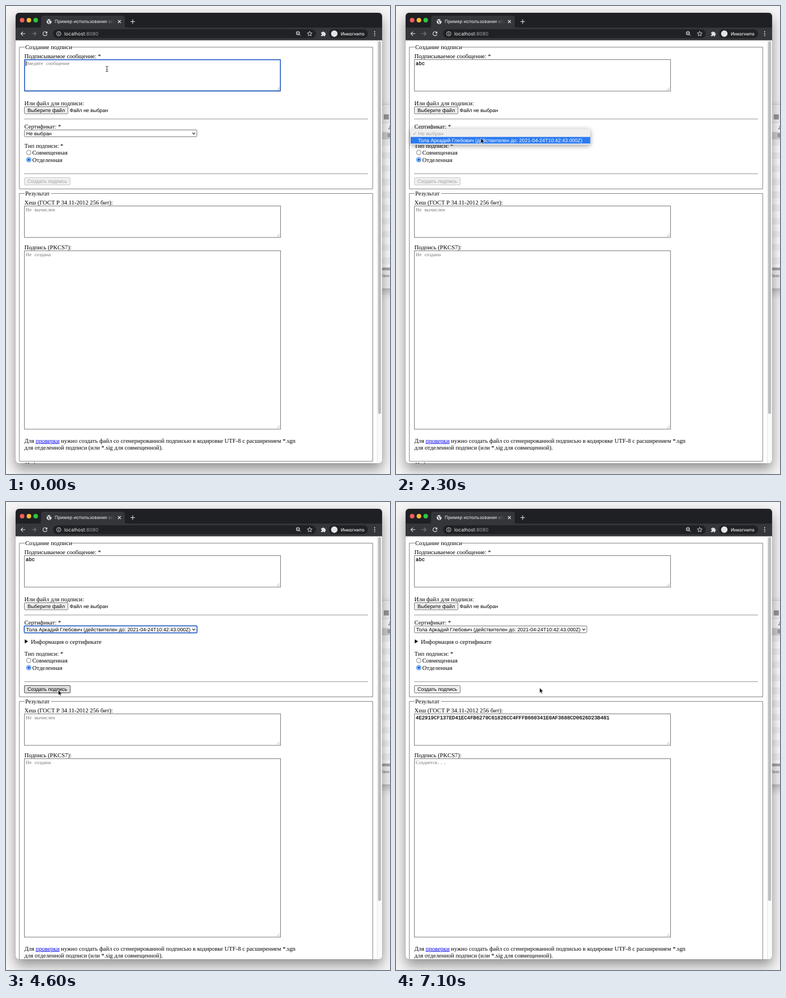
Animation, 679 px wide and 825 px high, one loop 8 s. Source, as an HTML page:

```html
<!DOCTYPE html>
<html lang="ru">
<head>
<meta charset="utf-8">
<title>Создание подписи</title>
<style>
html, body { margin: 0; width: 100%; height: 100%; overflow: hidden; background: #f5f5f6; }
.stage { position: relative; width: 679px; height: 825px; overflow: hidden; }
.stage > * { position: absolute; }

/* list window behind */
.back { left: 640px; top: 174px; width: 80px; height: 324px; background: #fcfcfc; box-shadow: 0 0 1px #777, 0 6px 16px rgba(0,0,0,.28); font: 7.5px Inter, sans-serif; color: #555; }
.back > * { position: absolute; left: 0; width: 100%; }
.bar { height: 31px; background: #f3f3f4; border-bottom: 1px solid #dcdcdc; }
.mark { left: 28px !important; top: 17px; width: 9px !important; height: 9px; background: #9a9a9c; }
.head { top: 32px; height: 16px; line-height: 17px; text-indent: 36px; font-style: italic; border-bottom: 1px solid #ddd; }
.rows { top: 48.5px; margin: 0; font: inherit; line-height: 11.58px; height: 239px; overflow: hidden; text-indent: 34.5px;
  background: linear-gradient(#d2d2d4 11.58px, transparent 0), repeating-linear-gradient(#fff 0 11.58px, #f3f4f5 0 23.16px); }
.slider { top: 287px; height: 5px; background: #a9a9ab; }
.foot { top: 292px; height: 32px; line-height: 20px; text-indent: 23px; background: #f2f2f3; font-size: 6.6px; }

.win { left: 17px; top: 12px; width: 648px; height: 794px; border-radius: 6px; background: #fff; box-shadow: 0 0 1px rgba(0,0,0,.5), 0 10px 22px rgba(0,0,0,.42); }
svg { left: 0; top: 0; }
text { font: 10.6px "Liberation Serif", serif; text-rendering: geometricPrecision; white-space: pre; }
.ui { font: 8.93px "Liberation Sans", sans-serif; }
.mono { font: 8.93px "Liberation Mono", monospace; stroke: #000; stroke-width: .25; }
.ph { font-size: 8.85px; fill: #757575; word-spacing: 3.1px; }
.ph tspan { font-family: "Liberation Mono", monospace; }
.chrome { font: 8px Inter, sans-serif; fill: #f1f1f2; }
.link { fill: #0000ee; text-decoration: underline; }
.line { fill: none; stroke: #868686; }
.box { fill: #fff; stroke: #7b7b7b; }
.btn { fill: #efefef; stroke: #7b7b7b; }
.hr { fill: #adadb1; }
.ring { fill: none; stroke: #2a63c4; stroke-width: 1.7; }
.icon { fill: none; stroke: #e4e4e6; stroke-width: 1.1; }
.icon .dim { stroke: #7d7e82; }
.icon .solid, .solid { fill: #e4e4e6; stroke: none; }

.t { animation: 8s step-end infinite; }
.empty { animation-name: empty; }
.keyA { animation-name: keyA; }
.keyB { animation-name: keyB; }
.keyC { animation-name: keyC; }
.caret { animation-name: caret; }
.focus { animation-name: focus; }
.over { animation-name: over; }
.menu { animation-name: menu; }
.pick { animation-name: pick; }
.before { animation-name: before; }
.after { animation-name: after; }
.shift { animation-name: shift; }
.thumb { animation-name: thumb; }
.selected { animation-name: selected; }
.hover { animation-name: hover; }
.idle { animation-name: idle; }
.busy { animation-name: busy; }
.waiting { animation-name: waiting; }
.done { animation-name: done; }
.beam { animation-name: beam; }
.arrow { animation-name: arrow; }
.pointer { animation: pointer 8s linear infinite; }

@keyframes empty { 0% { opacity: 1 } 3.75%, 100% { opacity: 0 } }
@keyframes keyA { 0% { opacity: 0 } 3.75%, 100% { opacity: 1 } }
@keyframes keyB { 0% { opacity: 0 } 6.25%, 100% { opacity: 1 } }
@keyframes keyC { 0% { opacity: 0 } 10%, 100% { opacity: 1 } }
@keyframes caret {
  0% { transform: none; opacity: 1 }
  3.75% { transform: translateX(5.36px); opacity: 1 }
  6.25% { transform: translateX(10.72px); opacity: 1 }
  10% { transform: translateX(16.08px); opacity: 1 }
  16.25% { transform: translateX(16.08px); opacity: 0 }
  22.5% { transform: translateX(16.08px); opacity: 1 }
  23.75%, 100% { opacity: 0 }
}
@keyframes focus { 0% { opacity: 1 } 23.75%, 100% { opacity: 0 } }
@keyframes over { 0% { opacity: 0 } 20% { opacity: 1 } 33.75%, 100% { opacity: 0 } }
@keyframes menu { 0% { opacity: 0 } 23.75% { opacity: 1 } 32.5% { opacity: .5 } 33.75%, 100% { opacity: 0 } }
@keyframes pick { 0% { opacity: 0 } 27.5%, 100% { opacity: 1 } }
@keyframes before { 0% { opacity: 1 } 33.75%, 100% { opacity: 0 } }
@keyframes after { 0% { opacity: 0 } 33.75%, 100% { opacity: 1 } }
@keyframes shift { 0% { transform: none } 33.75%, 100% { transform: translateY(21px) } }
@keyframes thumb { 0% { height: 657px } 33.75%, 100% { height: 641px } }
@keyframes selected { 0% { opacity: 0 } 33.75% { opacity: 1 } 60%, 100% { opacity: 0 } }
@keyframes hover { 0% { opacity: 0 } 55% { opacity: 1 } 63.75%, 100% { opacity: 0 } }
@keyframes idle { 0% { opacity: 1 } 61.25%, 100% { opacity: 0 } }
@keyframes busy { 0% { opacity: 0 } 61.25% { opacity: 1 } 68.75%, 100% { opacity: 0 } }
@keyframes waiting { 0% { opacity: 1 } 68.75%, 100% { opacity: 0 } }
@keyframes done { 0% { opacity: 0 } 68.75%, 100% { opacity: 1 } }
@keyframes beam { 0% { opacity: 1 } 15%, 100% { opacity: 0 } }
@keyframes arrow { 0% { opacity: 0 } 15%, 100% { opacity: 1 } }
@keyframes pointer {
  0%, 3.74% { transform: translate(178.5px, 111px) }
  3.75%, 9.99% { transform: translate(178.5px, 116px) }
  10%, 12.4% { transform: translate(178.5px, 121px) }
  13.75% { transform: translate(177px, 140px) }
  15% { transform: translate(175px, 172px) }
  16.25% { transform: translate(172px, 198px) }
  17.5%, 18.7% { transform: translate(170px, 211.5px) }
  22.5%, 27.4% { transform: translate(156px, 223px) }
  28.75%, 30% { transform: translate(150px, 233px) }
  32.5% { transform: translate(152px, 236px) }
  36.25%, 37.4% { transform: translate(167.5px, 265.5px) }
  37.5%, 49.9% { transform: translate(166.5px, 269px) }
  53.75% { transform: translate(124px, 306px) }
  57.5%, 60% { transform: translate(92.5px, 331.5px) }
  62.5% { transform: translate(104px, 333px) }
  65%, 66.2% { transform: translate(138px, 331.5px) }
  70%, 100% { transform: translate(254px, 327.5px) }
}
</style>
</head>
<body>
<div class="stage">
  <div class="back">
    <div class="bar"></div>
    <div class="mark"></div>
    <div class="head">Д</div>
    <pre class="rows">B
B
B
0
2
2
1
1
1
1
1
1
2
2
1
0
3
2
2
2
~</pre>
    <div class="slider"></div>
    <div class="foot">Tavo</div>
  </div>
  <div class="win"></div>

  <svg width="679" height="825" viewBox="0 0 679 825">
    <defs>
      <clipPath id="frame"><rect x="17" y="12" width="648" height="794" rx="6"/></clipPath>
      <linearGradient id="fade" gradientUnits="userSpaceOnUse" x1="174" x2="193">
        <stop stop-color="#f1f1f2"/><stop offset="1" stop-color="#f1f1f2" stop-opacity="0"/>
      </linearGradient>
      <path id="grip" d="M-6 -1 L-1 -6 M-3 -1 L-1 -3" stroke="#8a8a8a" stroke-width=".7"/>
      <path id="chevron" d="M-2.4 -1.2 L0 1.3 L2.4 -1.2" fill="none" stroke="#222" stroke-width="1.2"/>
    </defs>

    <g clip-path="url(#frame)">
      <!-- signing form, fixed part -->
      <path class="line" d="M33 72.5H23.5V322 M116.5 72.5H648.5V322"/>
      <text x="34" y="76">Создание подписи</text>
      <text x="32.5" y="91.5">Подписываемое сообщение: *</text>
      <rect class="box" x="32.5" y="94.5" width="453" height="55.5"/>
      <use href="#grip" x="485" y="149.5"/>
      <rect class="ring t focus" x="32.8" y="94.6" width="452.4" height="55" rx="1"/>
      <text class="ph t empty" x="34.8" y="104">Введите сообщение</text>
      <text class="mono t keyA" x="34.8" y="104">a</text>
      <text class="mono t keyB" x="40.16" y="104">b</text>
      <text class="mono t keyC" x="45.52" y="104">c</text>
      <rect class="t caret" x="34.8" y="96.5" width=".8" height="9.5"/>

      <text x="32.5" y="174.5">Или файл для подписи:</text>
      <rect class="btn" x="32.5" y="177.5" width="77" height="12.5" rx="1.5"/>
      <text class="ui" x="38" y="187">Выберите файл</text>
      <text class="ui" x="112.5" y="187">Файл не выбран</text>
      <rect class="hr" x="32" y="198.5" width="608" height="1.3"/>

      <text x="32.5" y="215.5">Сертификат: *</text>
      <rect class="box" x="32.5" y="218.5" width="305" height="12" rx="1"/>
      <rect class="line t over" x="32.5" y="218.5" width="305" height="12" rx="1" style="stroke:#444"/>
      <rect class="ring t selected" x="32.3" y="218.3" width="305.4" height="12.4" rx="1.5"/>
      <text class="ui t before" x="35.8" y="227.7">Не выбран</text>
      <text class="ui t after" x="35.8" y="227.7">Тола Аркадий Глебович (действителен до: 2021-04-24T10:42:43.000Z)</text>
      <use href="#chevron" x="332" y="224.5"/>
      <g class="t after">
        <path d="M33.2 242.2L39 245.7L33.2 249.2Z"/>
        <text x="44" y="249.5">Информация о сертификате</text>
      </g>

      <!-- everything pushed down by the certificate details -->
      <g class="t shift">
        <text x="32.5" y="249.5">Тип подписи: *</text>
        <circle class="box" cx="40.3" cy="258.3" r="4"/>
        <text x="46.5" y="262.3">Совмещенная</text>
        <circle cx="40.3" cy="271" r="4" fill="#fff" stroke="#1a6fe0"/>
        <circle cx="40.3" cy="271" r="2.5" fill="#1a6fe0"/>
        <text x="46.5" y="275.3">Отделенная</text>
        <rect class="hr" x="32" y="295" width="608" height="1.3"/>
        <g class="t before">
          <rect class="btn" x="32.5" y="302.5" width="81" height="13" rx="1.5" style="stroke:#c9c9c9"/>
          <text class="ui" x="38" y="312" fill="#a3a3a3">Создать подпись</text>
        </g>
        <g class="t after">
          <rect class="btn" x="32.5" y="302.5" width="81" height="13" rx="1.5"/>
          <rect class="t hover" x="32.5" y="302.5" width="81" height="13" rx="1.5" fill="#dedede" stroke="#505050"/>
          <text class="ui" x="38" y="312">Создать подпись</text>
        </g>
        <path class="line" d="M23.5 290V322.5H648.5V290"/>

        <path class="line" d="M33 330.5H23.5V802.5H648.5V330.5H80"/>
        <text x="34" y="334">Результат</text>
        <text x="32.5" y="349.7">Хеш (ГОСТ Р 34.11-2012 256 бит):</text>
        <rect class="box" x="32.5" y="352.5" width="453" height="55.5"/>
        <use href="#grip" x="485" y="407.5"/>
        <text class="ph t idle" x="34.8" y="362">Не вычислен</text>
        <text class="ph t busy" x="34.8" y="362">Вычисляется<tspan>...</tspan></text>
        <text class="mono t done" x="34.8" y="362">4E2919CF137ED41EC4FB6270C61826CC4FFFB660341E0AF3688CD0626D23B481</text>

        <text x="32.5" y="429">Подпись (PKCS7):</text>
        <rect class="box" x="32.5" y="431.5" width="453" height="314.5"/>
        <use href="#grip" x="485" y="745.5"/>
        <text class="ph t waiting" x="34.8" y="441">Не создана</text>
        <text class="ph t done" x="34.8" y="441">Создается<tspan>...</tspan></text>

        <text x="32.5" y="769.7">Для <tspan class="link">проверки</tspan> нужно создать файл со сгенерированной подписью в кодировке UTF-8 с расширением *.sgn</text>
        <text x="32.5" y="781.8">для отделенной подписи (или *.sig для совмещенной).</text>
        <text x="34" y="812.3">Информация</text>
      </g>

      <!-- scrollbar -->
      <path d="M656 61H665V806H656Z" fill="#fafafa"/>
      <path d="M656.5 61V806" stroke="#e6e6e6"/>
      <rect class="t thumb" x="658" y="62" width="5.2" height="657" rx="2.6" fill="#bdbdbf"/>

      <!-- browser bars -->
      <rect x="17" y="12" width="648" height="28" fill="#1f2024"/>
      <rect x="17" y="38" width="648" height="22.5" fill="#35363a"/>
      <path d="M58 38.5Q62 38.5 62 34V22Q62 17 67 17H205Q210 17 210 22V34Q210 38.5 214 38.5Z" fill="#35363a"/>
      <circle cx="28.5" cy="25" r="4" fill="#fb5d58"/>
      <circle cx="40.5" cy="25" r="4" fill="#f9bc32"/>
      <circle cx="52.5" cy="25" r="4" fill="#2cc642"/>
      <circle class="solid" cx="76.3" cy="27.5" r="4.4"/>
      <path d="M73 25.5l3 1 -1 2 2 1.2 -1 1.6 M77 24l2.8 1.2 -.8 2" fill="none" stroke="#35363a" stroke-width="1.1"/>
      <text class="chrome" x="86" y="30.2" style="fill:url(#fade)">Пример использования crypt</text>
      <rect x="83" y="41" width="465" height="15.5" rx="7.75" fill="#202124"/>
      <rect x="571" y="41" width="69" height="15.5" rx="7.75" fill="#202124"/>
      <g class="icon">
        <path d="M198 25l5 5m0 -5l-5 5"/>
        <path d="M220 27.5h8m-4 -4v8"/>
        <path d="M34 48.8H26.5m3.4 -3.5l-3.5 3.5 3.5 3.5"/>
        <path class="dim" d="M45.5 48.8H53m-3.4 -3.5l3.5 3.5 -3.5 3.5"/>
        <path d="M71.7 46.4a3.6 3.6 0 1 0 .8 3.2"/>
        <path class="solid" d="M73 44.6v3.7h-3.7z"/>
        <circle cx="93.3" cy="48.8" r="3.7" stroke-width=".9"/>
        <path d="M93.3 48.2v2.6m0 -4.4v1"/>
        <circle cx="516.2" cy="47.8" r="2.8"/>
        <path d="M518.3 49.9l2.6 2.6M514.8 47.8h2.8" stroke-width="1"/>
        <path d="M537 44.6l1.2 2.8 3 .2 -2.3 2 .7 3 -2.6 -1.6 -2.6 1.6 .7 -3 -2.3 -2 3 -.2z" stroke-width=".9"/>
        <path class="solid" d="M557.3 46.2h2.2a1.3 1.3 0 0 1 2.6 0h2.2v2.3a1.3 1.3 0 0 1 0 2.6v2.2h-2.3a1.2 1.2 0 0 0 -2.4 0h-2.3v-2.2a1.3 1.3 0 0 0 0 -2.6z"/>
        <circle class="solid" cx="580.5" cy="48.8" r="5.7"/>
        <path class="solid" d="M651 44.6h1.7v1.7h-1.7zm0 3.4h1.7v1.7h-1.7zm0 3.4h1.7v1.7h-1.7z"/>
      </g>
      <text class="chrome" x="103" y="52" style="font-size:8.55px">localhost<tspan fill="#a2a3a7">:8080</tspan></text>
      <text class="chrome" x="592" y="51.8" style="font-weight:500">Инкогнито</text>
    </g>

    <!-- certificate list -->
    <g class="t menu">
      <rect x="26" y="216.5" width="317.5" height="28" rx="3.5" fill="#efeff0" style="filter:drop-shadow(0 2px 4px rgba(0,0,0,.4))"/>
      <path d="M30.3 225l1.8 2.4 3.2 -5.4" fill="none" stroke="#a8a8aa" stroke-width=".9"/>
      <text class="ui" x="39" y="228" fill="#a8a8aa">Не выбран</text>
      <text class="ui" x="39" y="239.7" fill="#222">Тола Аркадий Глебович (действителен до: 2021-04-24T10:42:43.000Z)</text>
      <g class="t pick">
        <rect x="26" y="230.8" width="317.5" height="11.7" fill="#2c7bf0"/>
        <text class="ui" x="39" y="239.7" fill="#fff">Тола Аркадий Глебович (действителен до: 2021-04-24T10:42:43.000Z)</text>
      </g>
    </g>

    <g class="pointer">
      <path class="t beam" d="M-2.2 -4.8Q0 -4.8 0 -3.4Q0 -4.8 2.2 -4.8M0 -3.6V3.6M-2.2 4.8Q0 4.8 0 3.4Q0 4.8 2.2 4.8M-1 .9H1" fill="none" stroke="#222" stroke-width=".9"/>
      <path class="t arrow" d="M0 0V9.2L2.1 7.2L3.6 10.6L5.1 9.9L3.7 6.7H6.5Z" stroke="#fff" stroke-width=".7"/>
    </g>
  </svg>
</div>
</body>
</html>
```
